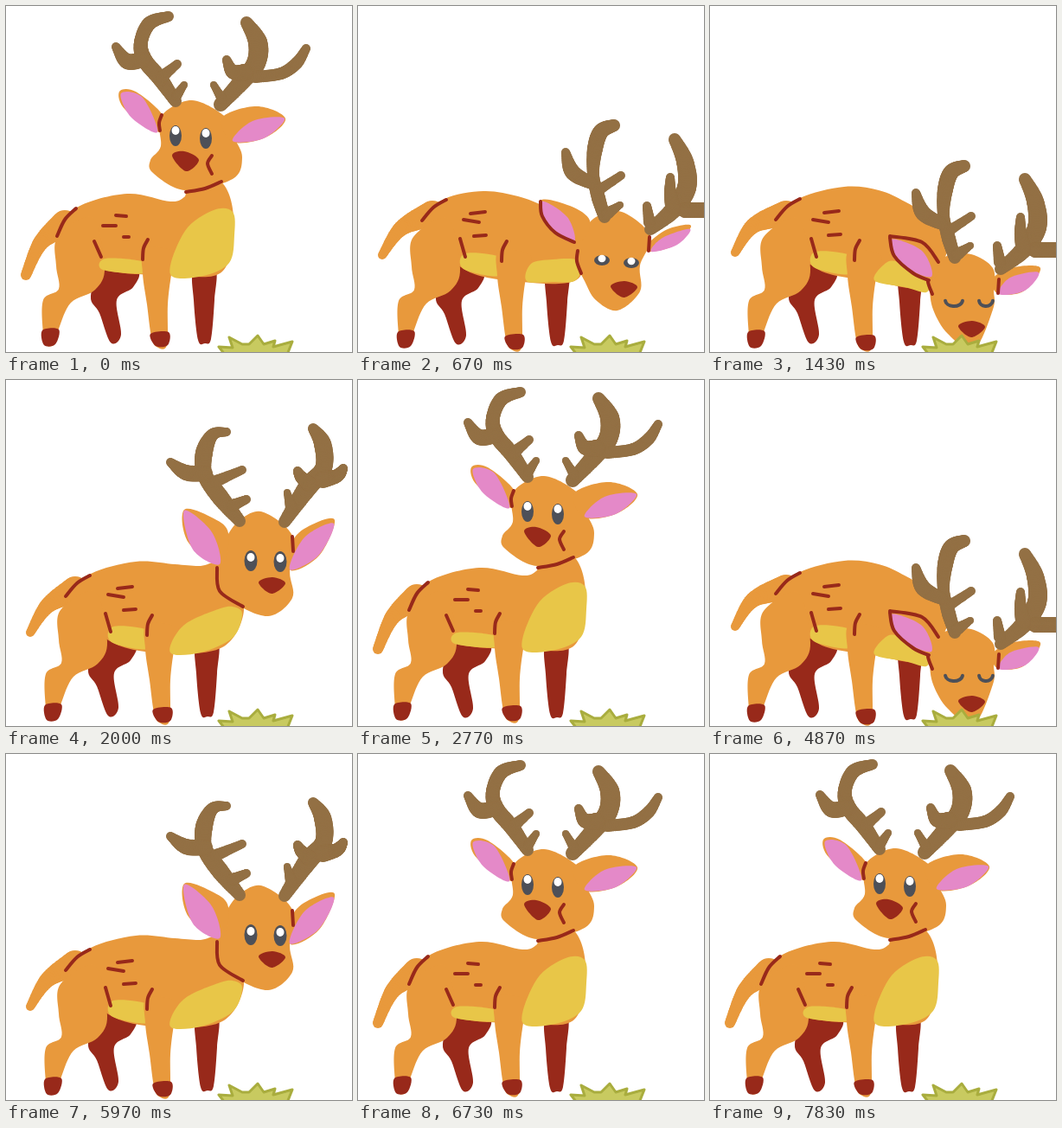
Animation, 400 px wide and 400 px high, one loop 7.91 s. Source, as an HTML page with a canvas:

```html
<!DOCTYPE html>
<html lang="en">
<head>
<meta charset="utf-8">
<title>Grazing deer</title>
<style>
html, body { margin: 0; width: 100%; height: 100%; overflow: hidden; background: #fff; }
canvas { display: block; }
</style>
</head>
<body>
<canvas id="stage" width="400" height="400"></canvas>
<script>
const ctx = document.getElementById('stage').getContext('2d');
const LOOP = 7910;
const ORANGE = '#e8993c', RED = '#98291a', YELLOW = '#e8c648', PINK = '#e489c8',
      HORN = '#937044', GREY = '#4d5058';

// Current pose: between pose `from` and the next one, at `part` of the way.
// 0 upright, 1 looking down, 2 bending, 3 grazing.
let from = 0, part = 0;

const mix = (a, b) => a + (b - a) * part;

// Blends the four poses of a shape into points of `size` numbers each.
// A bare "dx dy" moves the last full shape; '' hides the shape in that pose.
function blend(poses, size) {
  let full;
  const all = poses.map(text => {
    if (!text) return null;
    const v = text.split(' ').map(Number);
    if (v.length > 2) return full = v;
    return full.map((n, i) => n + (i % size < 2 ? v[i % size] : 0));
  });
  let a = all[from], b = all[from + 1];
  if (!a || !b) a = b = part < .5 ? a : b;
  const points = [];
  if (a) for (let i = 0; i < a.length; i += size)
    points.push(a.slice(i, i + size).map((n, j) => mix(n, b[i + j])));
  return points;
}

function trace(points, closed) {
  const n = points.length;
  const at = i => points[closed ? (i + n) % n : Math.max(0, Math.min(n - 1, i))];
  ctx.beginPath();
  if (n) ctx.moveTo(...points[0]);
  for (let i = 0; i < (closed ? n : n - 1); i++) {
    const [a, b, c, d] = [-1, 0, 1, 2].map(k => at(i + k));
    ctx.bezierCurveTo(b[0] + (c[0] - a[0]) / 6, b[1] + (c[1] - a[1]) / 6,
                      c[0] - (d[0] - b[0]) / 6, c[1] - (d[1] - b[1]) / 6, c[0], c[1]);
  }
}

function fill(color, ...poses) {
  trace(blend(poses, 2), true);
  ctx.fillStyle = color;
  ctx.fill();
}

function line(...poses) {
  trace(blend(poses, 2), false);
  ctx.strokeStyle = RED;
  ctx.lineWidth = 4;
  ctx.stroke();
}

// Tapered limb through points of x, y and radius.
function limb(color, ...poses) {
  const p = blend(poses, 3), steps = 16;
  for (let i = 0; i < p.length - 1; i++) {
    const a = p[i - 1] || p[i], b = p[i], c = p[i + 1], d = p[i + 2] || c;
    for (let s = 0; s <= steps; s++) {
      const t = s / steps;
      const [x, y, r] = b.map((v, j) => v + t / 2 * (c[j] - a[j] +
        t * (2 * a[j] - 5 * v + 4 * c[j] - d[j] + t * (3 * (v - c[j]) + d[j] - a[j]))));
      dot(x, y, r, r, color);
    }
  }
}

function dot(x, y, rx, ry, color) {
  ctx.fillStyle = color;
  ctx.beginPath();
  ctx.ellipse(x, y, rx, ry, 0, 0, 7);
  ctx.fill();
}

function drawBody() {
  // tail
  limb(ORANGE, '68 251 15 40 274 9 23 311 6', '80 242 15 48 261 9 28 292 5', '86 240 15 50 257 9 28 288 5', '88 240 15 50 254 9 29 285 5');
  // far legs
  fill(RED, '112 300 152 306 147 325 128 340 133 380 121 389 108 355 98 336', '-3 -1', '-8 1', '-7 0');
  fill(RED, '217 306 242 304 241 340 237 385 230 390 222 386 217 340', '3 -1', '1 2', '2 2');
  // torso
  fill(ORANGE,
    '82 233 140 217 190 226 206 221 212 212 248 203 263 245 250 307 190 311 113 304 59 266',
    '98 224 150 210 195 213 225 215 246 211 250 235 275 264 252 308 190 316 122 303 70 250',
    '100 223 145 214 185 220 215 231 240 240 260 260 262 290 250 318 190 319 122 304 76 248',
    '104 222 155 209 195 213 225 226 250 242 272 265 272 290 245 325 190 318 122 303 75 247');
  // near hind leg, belly, near front leg, chest
  fill(ORANGE, '60 266 58 300 61 327 43 340 43 378 47 392 56 391 61 373 75 343 103 328 114 302 100 245', '3 0', '4 1', '2 1');
  fill(YELLOW, '115 292 160 296 160 309 112 305', '124 285 166 290 164 311 122 303', '0 1', '-2 -1');
  fill(ORANGE, '160 280 158 309 163 345 168 382 174 394 186 392 187 345 191 311 196 285', '3 2', '3 3', '1 3');
  fill(YELLOW,
    '262 238 240 236 207 260 190 310 228 312 258 297 264 265',
    '266 263 248 264 205 284 190 315 225 315 262 298 273 272',
    '252 293 225 293 200 298 195 318 225 319 250 318 258 304',
    '240 313 222 298 205 296 190 317 225 325 250 331 253 318');
  // hooves
  fill(RED, '42 375 61 374 57 391 44 392', '3 1', '4 2', '2 2');
  fill(RED, '167 379 188 377 187 392 173 393', '3 2', '3 3', '2 4');
  // haunch and leg lines, then spots
  line('81 234 68 247 59 266', '97 226 82 235 69 250', '5 -2', '7 -3');
  line('102 272 110 290', '115 270 121 291', '3 -1', '2 -1');
  line('164 270 159 280 158 293', '5 2', '8 2', '9 1');
  line('127 242 139 243', '129 241 146 239', '1 -1', '3 -2');
  line('112 254 127 254', '118 248 136 251', '4 -1', '1 -1');
  line('136 267 142 267', '136 266 150 265', '-2 0', '1 -1');
}

function drawEars() {
  fill(ORANGE, '181 126 150 99 131 99 138 120 178 146', '257 177 240 160 206 150 211 188 249 213',
    '268 248 245 231 211 225 222 259 257 272', '266 296 245 272 207 267 220 299 256 317');
  fill(PINK, '133 101 158 106 175 146 144 128', '206 151 238 176 247 213 216 196',
    '212 226 242 244 250 273 222 258', '209 271 245 284 256 314 222 300');
  line('180 126 177 135 178 144', '', '', '');
  line('', '', '211 226 213 243 228 262 250 273', '208 269 213 290 235 310 253 318');
  line('', '', '', '208 267 245 274 264 297');
  fill(ORANGE, '250 129 290 116 323 130 300 152 262 157', '332 185 354 167 380 162 362 203 329 220',
    '335 275 358 258 385 254 365 277 336 284', '328 315 352 303 382 304 362 331 332 333');
  fill(PINK, '322 130 285 133 262 156 298 153', '379 166 345 182 328 219 361 203',
    '384 258 352 268 339 284 369 276', '380 309 347 315 334 334 364 330');
  line('', '331 181 332 198', '337 267 336 283', '-3 50');
}

function drawAntlers() {
  const left = (...poses) => limb(HORN, ...poses, '-2 48');
  const right = (...poses) => limb(HORN, ...poses, '-2 47');
  left('196 110 7 178 84 9 160 62 9 156 42 8 166 20 8 188 12 6',
    '270 163 7 248 136 10 230 110 9 229 84 10 239 63 7 255 60 5',
    '285 244 7 278 222 8 272 195 7 274 165 9 281 145 9 296 138 7');
  left('158 62 9 140 64 9 127 47 5', '230 108 9 208 107 9 190 95 5', '270 205 7 248 192 9 240 169 5');
  left('180 82 7 198 67 5', '243 117 7 273 104 5', '281 211 6 304 196 5');
  left('197 104 6 206 91 4', '262 145 7 278 138 5', '288 240 7 303 230 4');
  right('248 114 8 272 88 10 289 66 11 291 42 11 278 19 7',
    '322 164 7 348 125 11 367 102 10 366 74 10 355 56 6',
    '338 258 7 364 236 10 380 210 11 378 180 10 366 154 7');
  right('288 82 7 318 78 7 336 66 7 347 49 5', '366 115 10 380 112 8 386 108 7 390 102 5', '378 236 9 390 236 9 400 236 9 410 236 9');
  right('276 77 10 262 76 8 255 62 5', '350 120 9 341 112 7 337 105 5', '364 232 9 361 215 7 361 198 5');
  right('250 108 6 240 91 4', '330 148 7 325 130 4', '337 250 7 334 231 5');
}

// Per pose: left x y, right x y, radii, highlight lift
const eyes = [
  [196, 150, 231, 153, 7, 12, 6],
  [283, 209, 317, 210, 7.5, 12, 4],
  [282, 294, 316, 297, 9, 6, 2],
  [282, 342, 319, 342, 10, 0, 0]
];

function drawEyes() {
  const [lx, ly, rx, ry, w, h, lift] = eyes[from].map((v, i) => mix(v, eyes[from + 1][i]));
  [[lx, ly], [rx, ry]].forEach(([x, y], side) => {
    if (h < 4) {
      ctx.strokeStyle = GREY;
      ctx.lineWidth = 4;
      ctx.beginPath();
      ctx.ellipse(x, y - 1, side ? 8 : w, 7, 0, .1, Math.PI - .1);
      ctx.stroke();
    } else {
      dot(x, y, w, h, GREY);
      dot(x, y - lift, 4.5, Math.min(5, h * .7), '#fff');
    }
  });
}

function drawHead() {
  fill(ORANGE,
    '215 109 256 130 264 152 273 175 262 200 207 213 170 193 167 178 179 162 179 128',
    '298 153 331 180 328 222 331 252 303 273 262 256 247 232 248 205 257 178 274 159',
    '305 238 338 266 326 300 326 330 300 352 275 340 262 318 254 298 257 268 275 244',
    '302 288 327 304 328 330 327 352 305 398 275 380 258 352 254 325 256 302 274 290');
  line('208 215 230 211 249 203', '244 217 247 244 274 262', '254 283 253 295 258 309', '-1 25');
  drawEars();
  drawAntlers();
  fill(RED, '192 173 206 168 223 178 208 191', '292 234 308 228 323 235 307 247', '0 90', '-5 137');
  line('238 173 233 182 238 194', '', '', '');
  drawEyes();
}

const grass = new Path2D('M253 403L246 394 262 395 258 383 273 391 281 391 291 381 298 391 311 387 309 394 331 388 325 403Z');

function drawGrass() {
  ctx.fillStyle = '#c8ca60';
  ctx.strokeStyle = '#a9ad3e';
  ctx.lineWidth = 3;
  ctx.fill(grass);
  ctx.stroke(grass);
}

// Time and pose; the picture holds between the times.
const keys = [
  [0, 0], [130, .05], [230, .15], [330, .35], [470, 1], [670, 2], [800, 2.43], [900, 3],
  [1800, 2.43], [1900, 2], [2000, 1], [2100, .35], [2200, 0], [2330, -.05], [2430, .1],
  [2530, 0], [3770, 0], [4070, .05], [4170, .15], [4270, .35], [4400, 1], [4630, 2],
  [4730, 2.43], [4870, 3], [5730, 2.43], [5830, 2], [5970, 1], [6070, .35], [6200, 0],
  [6330, -.05], [6430, .1], [6530, 0], [7730, 0], [LOOP, 0]
];

function frame(now) {
  const time = now % LOOP;
  const i = keys.findIndex((key, n) => keys[n + 1][0] > time);
  const [start, pose] = keys[i];
  from = Math.max(0, Math.min(2, Math.floor(pose)));
  part = pose - from;
  // Long holds are chewing: a small stepped bob of the head.
  const chewing = keys[i + 1][0] - start > 500;
  const bob = chewing ? [0, 1, 2, 1][Math.floor((time - start) / 105) % 4] : 0;

  ctx.fillStyle = '#fff';
  ctx.fillRect(0, 0, 400, 400);
  ctx.lineCap = ctx.lineJoin = 'round';
  drawBody();
  ctx.save();
  ctx.translate(0, pose > 1 ? -bob : bob);
  drawHead();
  ctx.restore();
  drawGrass();
  requestAnimationFrame(frame);
}
requestAnimationFrame(frame);
</script>
</body>
</html>
```
